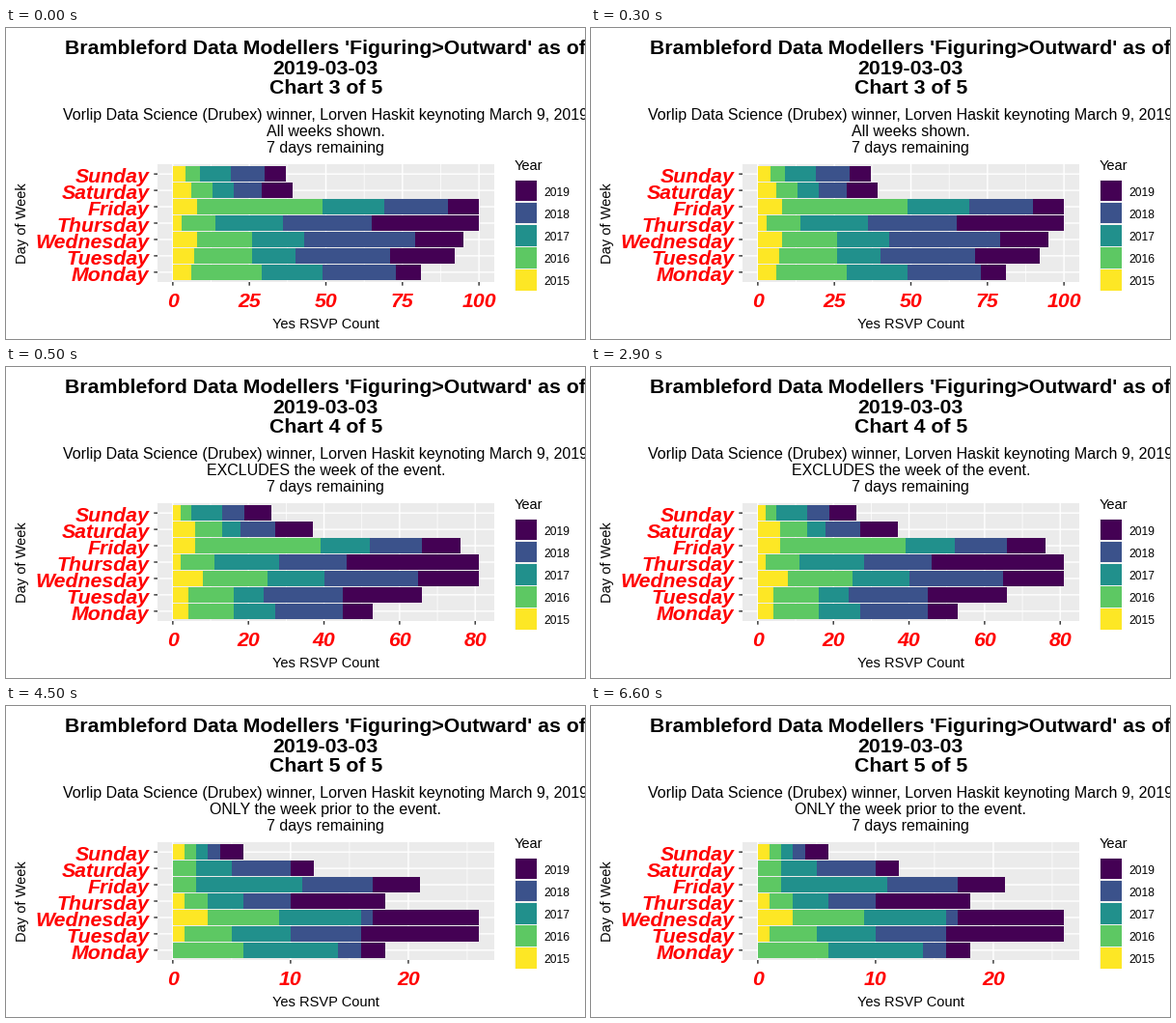
Animation, 600 px wide and 322 px high, one loop 8 s. Source, as a matplotlib script:

```python
import matplotlib.pyplot as plt
from matplotlib.animation import FuncAnimation
from matplotlib.patches import Rectangle

W, H, DPI = 600, 322, 100
STEP = 500  # ms per frame

plt.rcParams["font.family"] = "Liberation Sans"
plt.rcParams["toolbar"] = "None"

DAYS = ["Sunday", "Saturday", "Friday", "Thursday", "Wednesday", "Tuesday", "Monday"]
YEARS = [2015, 2016, 2017, 2018, 2019]
COLORS = ["#FDE725", "#5DC863", "#21908C", "#3B528B", "#440154"]

# Running totals over the years, one row per day.
CHARTS = [
    dict(number=3, note="All weeks shown.", start=0, tick=25, rows=[
        (4, 9, 19, 30, 37), (6, 13, 20, 29, 39), (8, 49, 69, 90, 100),
        (3, 14, 36, 65, 100), (8, 26, 43, 79, 95), (7, 26, 40, 71, 92),
        (6, 29, 49, 73, 81)]),
    dict(number=4, note="EXCLUDES the week of the event.", start=500, tick=20, rows=[
        (2, 5, 13, 19, 26), (6, 13, 18, 27, 37), (6, 39, 52, 66, 76),
        (2, 11, 28, 46, 81), (8, 25, 40, 65, 81), (4, 16, 24, 45, 66),
        (4, 16, 27, 45, 53)]),
    dict(number=5, note="ONLY the week prior to the event.", start=4500, tick=10, rows=[
        (1, 2, 3, 4, 6), (0, 2, 5, 10, 12), (0, 2, 11, 17, 21),
        (1, 3, 6, 10, 18), (3, 9, 16, 17, 26), (1, 5, 10, 16, 26),
        (0, 6, 14, 16, 18)]),
]

# Panel edges in pixels, with 5 % padding along x and 0.6 rows along y.
LEFT, RIGHT, TOP, BOTTOM = 157, 506, 141, 263
SPAN = (RIGHT - LEFT) / 1.1
ORIGIN = LEFT + 0.05 * SPAN
ROW = (BOTTOM - TOP) / 7.2
CENTERS = [TOP + ROW * (0.6 + i) for i in range(len(DAYS))]
MID = 331.3
MAJOR, MINOR = 1.42, 0.71

fig = plt.figure(figsize=(W / DPI, H / DPI), dpi=DPI, facecolor="white")
ax = fig.add_axes([0, 0, 1, 1])
ax.set_xlim(0, W)
ax.set_ylim(H, 0)
ax.axis("off")


def text(x, y, s, px, ha="center", **kw):
    return ax.text(x, y, s, fontsize=px * 72 / DPI, ha=ha, va="baseline", **kw)


def box(x0, y0, x1, y1, color, z=1):
    x0, y0, x1, y1 = (round(v) for v in (x0, y0, x1, y1))
    return ax.add_patch(Rectangle((x0, y0), x1 - x0, y1 - y0,
                                  facecolor=color, linewidth=0, zorder=z))


def line(xs, ys, px, color="white", z=2):
    return ax.plot(xs, ys, color=color, lw=px * 72 / DPI, zorder=z,
                   solid_capstyle="butt", snap=False)[0]


def label(x, y, s, ha):
    return text(x, y, s, 21.33, ha, color="red", weight="bold", style="italic")


def draw_fixed():
    text(MID, 27, "Brambleford Data Modellers 'Figuring>Outward' as of", 21.33, weight="bold")
    text(MID, 48, "2019-03-03", 21.33, weight="bold")
    text(MID, 95, "Vorlip Data Science (Drubex) winner, "
                  "Lorven Haskit keynoting March 9, 2019", 16)
    text(MID, 129, "7 days remaining", 16)
    text(MID, 311, "Yes RSVP Count", 14.67)
    ax.text(21, 202, "Day of Week", fontsize=14.67 * 72 / DPI, rotation=90,
            rotation_mode="anchor", ha="center", va="baseline")

    box(LEFT, TOP, RIGHT, BOTTOM, "#EBEBEB")
    for day, y in zip(DAYS, CENTERS):
        line([LEFT, RIGHT], [y, y], MAJOR)
        line([LEFT - 3.7, LEFT], [y, y], MAJOR, "#333333")
        label(148.5, y + 9.3, day, "right")

    text(527, 147, "Year", 14.67, "left")
    key, top = 23.04, 157.1
    box(527.4, top, 550.4, top + 5 * key, "#F2F2F2")
    for i, (year, color) in enumerate(zip(YEARS[::-1], COLORS[::-1])):
        y = top + i * key
        box(528, y + 0.7, 550, y + key - 0.7, color, 3)
        text(557, y + 16.7, str(year), 12, "left")


def draw_chart(chart):
    most = max(row[-1] for row in chart["rows"])
    tick = chart["tick"]

    def pos(v):
        return ORIGIN + SPAN * v / most

    parts = [text(MID, 68, f"Chart {chart['number']} of 5", 21.33, weight="bold"),
             text(MID, 112, chart["note"], 16)]

    half = 0
    while pos(half * tick / 2) < RIGHT:
        value = half * tick / 2
        x = pos(value)
        if half % 2:
            parts.append(line([x, x], [TOP, BOTTOM], MINOR))
        else:
            parts += [line([x, x], [TOP, BOTTOM], MAJOR),
                      line([x, x], [BOTTOM, BOTTOM + 3.7], MAJOR, "#333333"),
                      label(x, 289, f"{value:.0f}", "center")]
        half += 1

    for y, row in zip(CENTERS, chart["rows"]):
        for a, b, color in zip((0,) + row, row, COLORS):
            if b > a:
                parts.append(box(pos(a), y - 0.475 * ROW, pos(b), y + 0.475 * ROW, color, 3))
    return parts


draw_fixed()
groups = [draw_chart(chart) for chart in CHARTS]


def update(i):
    now = i * STEP
    current = max(k for k, chart in enumerate(CHARTS) if chart["start"] <= now)
    for k, group in enumerate(groups):
        for part in group:
            part.set_visible(k == current)
    return []


anim = FuncAnimation(fig, update, frames=16, init_func=lambda: update(0),
                     interval=STEP, repeat=True, repeat_delay=0, blit=False)
plt.show()
```
